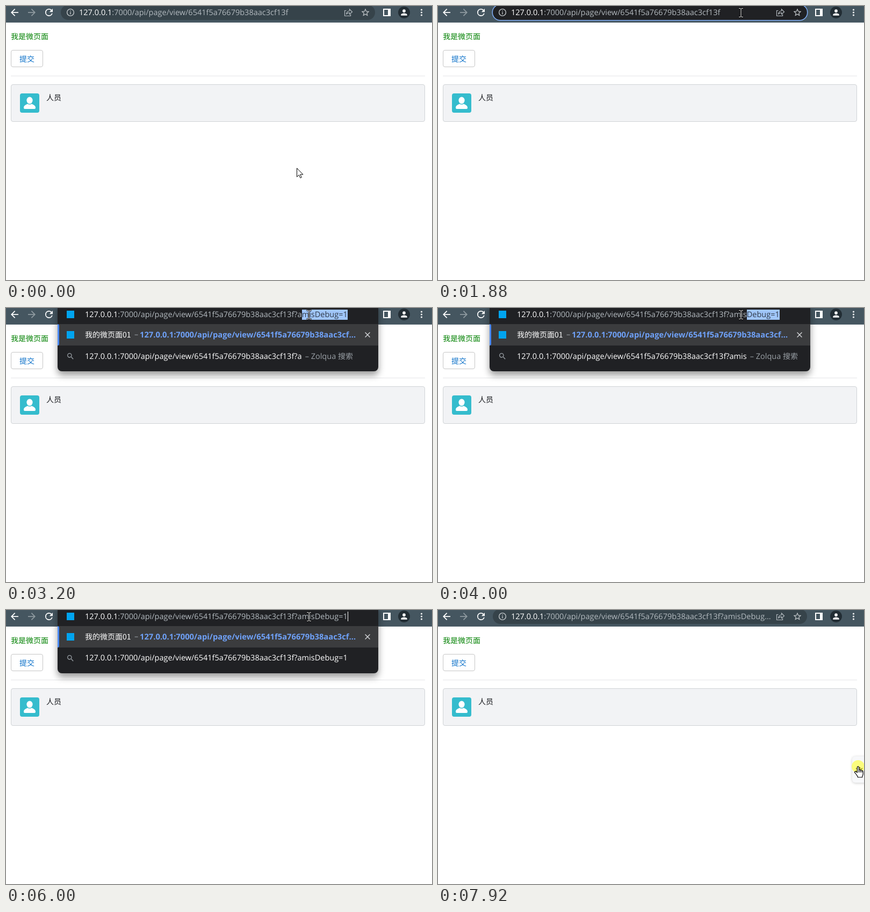
These frames come from a looping animation (793x511 px, 8000 ms). An HTML page:

```html
<!DOCTYPE html>
<html lang="zh">
<head>
<meta charset="utf-8">
<style>
html, body { margin: 0; width: 793px; height: 511px; overflow: hidden; background: #fff; }
body { position: relative; font: 14.5px/20px "Open Sans", "Noto Sans CJK SC", "Noto Sans CJK", sans-serif; text-rendering: geometricPrecision; }
div, svg { position: absolute; white-space: pre; box-sizing: border-box; }
svg { overflow: visible; }
#button { left: 9px; top: 82px; width: 60px; height: 32px; border: 1px solid #c6c6c6; border-radius: 4px; }
#rule { left: 9px; top: 130px; width: 771px; height: 1px; background: #e5e6e8; }
#card { left: 9px; top: 146px; width: 771px; height: 70px; background: #f2f3f5; border: 1px solid #d0d3d6; border-radius: 4px; }
#debug { left: 771px; top: 273px; width: 30px; height: 49px; background: #f7f8fa; border-radius: 6px; box-shadow: 0 1px 5px rgba(0,0,0,.2); }
#toolbar { left: 0; top: 0; width: 793px; height: 31px; background: #455660; border-bottom: 1px solid #596973; }
#bar { left: 102px; top: -2px; width: 585px; height: 28px; border-radius: 14px; background: #36434a; }
#bar.focus { background: #202124; box-shadow: 0 0 0 1.5px #82b0f8; }
#drop { left: 96px; top: -10px; width: 597px; background: #202124; border-radius: 8px; box-shadow: 0 7px 13px rgba(0,0,0,.4); }
.active { left: 96px; top: 30px; width: 597px; height: 40px; background: #3b3c3e; }
.active::before { content: ""; position: absolute; width: 3px; height: 40px; background: #4b8bf5; border-radius: 0 3px 3px 0; }
.addr { color: #b3babf; }
.addr b, .white { font-weight: 500; color: #fff; }
.cjk { font: 14px/20px "Noto Sans CJK SC", "Noto Sans CJK", sans-serif; }
.sel, .sel b { background: #a0c6fa; color: #303b48; }
.caret { display: inline-block; width: 1px; height: 18px; margin-right: -1px; background: #fff; vertical-align: -4px; }
.grey { font-weight: 400; color: #9aa0a6; }
.link { font-weight: 700; font-size: 14.75px; color: #6fa1f8; }
.site { width: 14px; height: 14px; left: 113px; background: #00a4ef; }
</style>
</head>
<body>
<div class="cjk" style="left:9px;top:47px;color:green">我是微页面</div>
<div id="button"></div>
<div class="cjk" style="left:25px;top:89px;color:#0b70c8">提交</div>
<div id="rule"></div>
<div id="card">
  <svg style="left:16px;top:16px" width="36" height="36">
    <rect width="36" height="36" rx="4" fill="#35bccd"/>
    <ellipse cx="18" cy="13" rx="5.6" ry="6.4" fill="#fff"/>
    <path d="M7 27c0-5 4-5.500 7-7.500q4 2.500 8 0c3 2 7 2.500 7 7.500q0 2-2 2H9q-2 0-2-2z" fill="#fff"/>
  </svg>
  <div class="cjk" style="left:65px;top:14px;color:#16181c">人员</div>
</div>
<div id="debug">
  <svg style="left:6px;top:19px" width="14" height="14" fill="#1b1f24" stroke="#1b1f24">
    <path d="M4 4a3 3 0 0 1 6 0z" stroke="none"/>
    <path d="M3.500 5h3v8.500q-3-.5-3-4zM7.500 5h3v4.500q0 3.500-3 4z" stroke="none"/>
    <path d="M1 3l3 2.500M13 3l-3 2.500M0 8.500h4M10 8.500h4M1.500 13l2.500-2.500M12.500 13L10 10.500" fill="none" stroke-width="1.500"/>
  </svg>
</div>
<div id="toolbar"></div>
<div id="bar"></div>
<svg id="tools" width="793" height="31" style="left:0;top:0"></svg>
<div id="omni"></div>
<svg id="pointer" width="793" height="511" style="left:0;top:0">
  <circle id="halo" r="12" fill="#ff0" fill-opacity=".5"/>
  <g id="arrow"><path d="M.5.5v16.200l3.800-3.600 2.600 5.600 2.400-1.100-2.600-5.400h5.200z" fill="#fff" stroke="#000"/></g>
  <g id="beam" fill="none">
    <path d="M-4.500-7.500h3.500L0-6.500 1-7.500h3.500M-4.500 8.500h3.500L0 7.500 1 8.500h3.500M0-7V8" stroke="#000" stroke-width="2.600"/>
    <path d="M-4-7.500h3L0-6.500 1-7.500h3M-4 8.500h3L0 7.500 1 8.500h3M0-7V8" stroke="#fff"/>
  </g>
  <g id="hand"><path d="M-1.500 11V1.500q0-1.700 1.500-1.700t1.500 1.700V7q0-1.400 1.400-1.400T4.300 7v.8q0-1.300 1.300-1.300T7 7.900v.8q0-1.200 1-1.200t1.200 1.500v4.500c0 3-1.500 3.500-1.500 6.500H-.5c0-2-1.200-2.700-2.500-4.800-1.200-2-3.500-3.700-3.500-4.700 0-2 2.200-1.700 3.500-.3zM1.500 7v4M4.300 7.800V11M7 8.500V11" fill="#fff" stroke="#000" stroke-width="1.200"/></g>
</svg>
<script>
const $ = id => document.getElementById(id);
const LOOP = 8000;
const HOST = '127.0.0.1', PATH = ':7000/api/page/view/6541f5a76679b38aac3cf13f';
const QUERY = '?amisDebug=1';

const glyph = {
  back: 'M20 11H7.830l5.590-5.590L12 4l-8 8 8 8 1.410-1.410L7.830 13H20z',
  next: 'M4 11h12.170l-5.590-5.590L12 4l8 8-8 8-1.410-1.410L16.170 13H4z',
  reload: 'M17.650 6.350A7.960 7.960 0 0 0 12 4a8 8 0 1 0 7.730 10h-2.080A6 6 0 1 1 12 6c1.660 0 3.140.69 4.220 1.780L13 11h7V4z',
  close: 'M19 6.400L17.600 5 12 10.600 6.400 5 5 6.400 10.600 12 5 17.600 6.400 19 12 13.400 17.600 19 19 17.600 13.400 12z',
  info: 'M11 7h2v2h-2zm0 4h2v6h-2zm1-9a10 10 0 1 0 0 20 10 10 0 0 0 0-20zm0 18a8 8 0 1 1 0-16 8 8 0 0 1 0 16z',
  star: 'M22 9.240l-7.190-.62L12 2 9.190 8.630 2 9.240l5.460 4.730L5.820 21 12 17.270 18.180 21l-1.630-7.030zM12 15.400l-3.760 2.270 1-4.280-3.320-2.880 4.380-.38L12 6.100l1.710 4.040 4.380.38-3.320 2.880 1 4.280z',
  person: 'M12 12a4 4 0 1 0 0-8 4 4 0 0 0 0 8zm0 2c-2.670 0-8 1.340-8 4v2h16v-2c0-2.660-5.330-4-8-4z',
  search: 'M15.500 14h-.79l-.28-.27A6.470 6.470 0 0 0 16 9.500 6.500 6.500 0 1 0 9.500 16c1.610 0 3.090-.59 4.230-1.570l.27.28v.79l5 4.990L20.490 19zm-6 0a4.500 4.500 0 1 1 0-9 4.500 4.500 0 0 1 0 9z',
  globe: 'M12 2a10 10 0 1 0 0 20 10 10 0 0 0 0-20zm0 2a8 8 0 0 1 7.400 5H4.600A8 8 0 0 1 12 4zm-8 8l.2-1H11v9a8 8 0 0 1-7-8zm9 8v-9h6.800A8 8 0 0 1 13 20z'
};
const icon = (name, x, y, size, color = '#fff') =>
  `<path d="${glyph[name]}" fill="${color}" fill-rule="evenodd" transform="translate(${x - size / 2} ${y - size / 2}) scale(${size / 24})"/>`;
const svg = body => `<svg width="1" height="1" style="left:0;top:0">${body}</svg>`;

const drawTools = loading => {
  $('tools').innerHTML =
    icon('back', 16, 12, 21) + icon('next', 48, 12, 21, '#8f9aa0') +
    icon(loading ? 'close' : 'reload', 80, 12, 21) +
    icon('info', 120, 12, 17, '#c3c8cb') + icon('star', 669, 12, 18, '#c3c8cb') +
    `<path d="M633.500 8.500h-3v10h11v-3M633.500 15.500q1-6 6-6.500V6l5 5-5 4.500v-3q-4 0-6 3z" fill="none" stroke="#b3babf" stroke-width="1.200"/>
     <path d="M702 5h14v14h-14zM704 7v10h7V7z" fill="#fff" fill-rule="evenodd"/>
     <circle cx="741" cy="12" r="11" fill="#222d34"/>` + icon('person', 741, 12, 17) +
    [7, 12, 17].map(y => `<circle cx="773.500" cy="${y}" r="1.600" fill="#fff"/>`).join('');
};

// time, mode, typed text (a number counts typed letters of QUERY), dropdown rows
const scenes = [
  [0, 'idle'],
  [1080, 'all'],
  [1320, 'caret', ''],
  [1880, 'focus', ''],
  [2120, 'caret', '?'],
  [2200, 'drop', 1, 'site search old'],
  [3200, 'drop', 2, 'site search'],
  [3600, 'drop', 3, 'site search'],
  [3720, 'drop', 4, 'site search'],
  [4000, 'drop', 5, 'site search'],
  [4320, 'drop', '?amisd', 'typed search'],
  [4800, 'drop', '?amis', 'typed search old'],
  [5120, 'drop', 6, 'site search'],
  [5320, 'drop', 7, 'site search'],
  [5400, 'drop', 8, 'site search'],
  [5640, 'drop', 10, 'site search'],
  [5800, 'drop', 11, 'site search'],
  [6000, 'drop', 12, 'site search'],
  [6320, 'idle', '?amisDebug…']
];

const at = (x, y, cls, text) => `<div class="${cls}" style="left:${x}px;top:${y}px">${text}</div>`;
const address = (x, rest, cls = '') => at(x, 3, 'addr', `<span class="${cls}"><b>${HOST}</b>${PATH}</span>${rest}`);
const favicon = y => `<div class="site" style="top:${y - 7}px"></div>`;
const caret = '<span class="caret"></span>';

function row(kind, y, typed) {
  const url = HOST + PATH, top = y - 10;
  if (kind === 'site' || kind === 'old') {
    const tail = kind === 'site' ? url.slice(0, -3) : url + '?';
    return favicon(y) + at(147, top, 'cjk white', '我的微页面01') + at(239, top, 'grey', '–') +
      at(249, top, 'link', tail + '…') + (kind === 'site' ? svg(icon('close', 673, y, 17, '#d5d7da')) : '');
  }
  if (kind === 'typed') return svg(icon('globe', 120, y, 17, '#9aa0a6')) + at(147, top, 'white', url + typed);
  const hint = typed.length < 7 ? '<span class="grey" style="margin-left:6px">– Zolqua <span class="cjk">搜索</span></span>' : '';
  return svg(icon('search', 120, y, 16, '#9aa0a6')) + at(147, top, 'white', url + typed + hint);
}

function drawOmni([, mode, text = '', rows]) {
  $('bar').className = mode === 'idle' ? '' : 'focus';
  if (mode !== 'drop') {
    $('omni').innerHTML = address(136, text + (mode === 'caret' ? caret : ''), mode === 'all' ? 'sel' : '');
    return;
  }
  const inline = typeof text === 'number';
  const typed = inline ? QUERY.slice(0, text) : text;
  const rest = inline ? QUERY.slice(text) : '';
  const kinds = rows.split(' ');
  $('omni').innerHTML =
    `<div id="drop" style="height:${48 + kinds.length * 40}px"></div><div class="active"></div>` +
    (inline ? favicon(12) : svg(icon('globe', 120, 12, 17, '#9aa0a6'))) +
    address(147, typed + (rest ? `<span class="sel">${rest}</span>` : caret)) +
    kinds.map((kind, i) => row(kind, 50 + i * 40, typed)).join('');
}

const between = (t, a, b) => t >= a && t < b;
const show = (id, on) => { $(id).style.display = on ? '' : 'none'; };

// Pointer travels in 100 ms steps with eased progress
function glide(t, start, count, from, to) {
  const k = Math.max(0, Math.min(1, (Math.floor((t - start) / 100) + 1) / count));
  const e = k * k * (3 - 2 * k);
  return from.map((v, i) => v + (to[i] - v) * e);
}

function drawPointer(t) {
  const rest = t < 1680 ? [563, 11] : [564, 12];
  const [x, y] = t < 4000 ? glide(t, 280, 8, [541, 302], rest) : glide(t, 7240, 7, rest, [782, 292]);
  const kind = y < 27 && x < 688 ? 'beam' : x > 770 && y > 272 ? 'hand' : 'arrow';
  for (const id of ['arrow', 'beam', 'hand']) show(id, id === kind);
  const place = `translate(${Math.round(x)} ${Math.round(y)})`;
  $(kind).setAttribute('transform', place);
  $('halo').setAttribute('transform', place);
  show('halo', between(t, 1080, 1200) || between(t, 1320, 1400) || t >= 7920);
}

let scene, loading;
function draw(t) {
  const now = scenes.findLast(s => s[0] <= t);
  if (now !== scene) drawOmni(scene = now);
  const busy = between(t, 6320, 6520);
  if (busy !== loading) drawTools(loading = busy);
  show('card', !between(t, 6840, 6920));
  show('debug', t >= 6840);
  drawPointer(t);
}

const start = performance.now();
function tick() {
  draw((performance.now() - start) % LOOP);
  requestAnimationFrame(tick);
}
tick();
</script>
</body>
</html>
```
